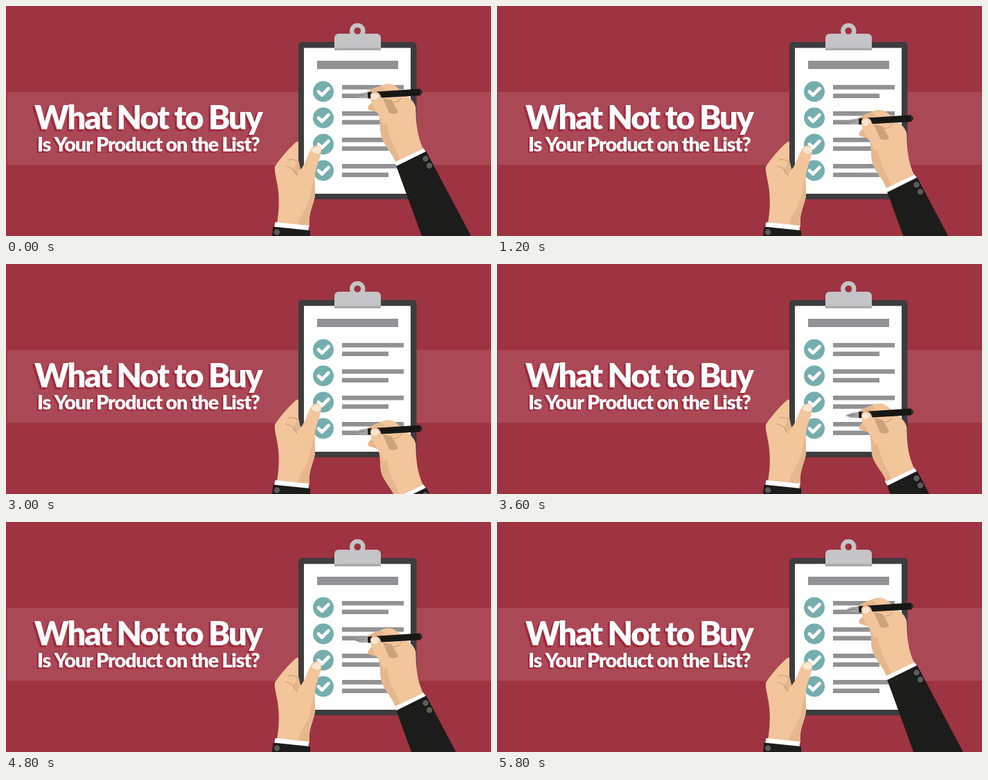
Recreate the animation shown at these times as an HTML page with a canvas. Size 700 px wide and 332 px high, loop 6 s.

```html
<!DOCTYPE html>
<html lang="en">
<head>
<meta charset="utf-8">
<title>What Not to Buy</title>
<style>
  html, body { margin: 0; width: 100%; height: 100%; overflow: hidden; background: #9e3341; }
  canvas { display: block; }
</style>
</head>
<body>
<canvas id="stage" width="700" height="332"></canvas>
<script>
const ctx = document.getElementById('stage').getContext('2d');

const LOOP = 6000;
const ROW = 38;
const STEP = 12.55;
const DOWN_TIMES = [0, 500, 700, 1200, 1400, 1600, 2100, 2300, 2500, 3000];
const UP_START = 3200, UP_HOLD = 200;
const UP_OFFSETS = [107, 97, 89, 82, 77, 68, 60, 52, 41, 32, 22, 14, 4, -3];

const SKIN = '#f2c59b', SHADE = '#e5b78d', FOLD = '#cba27a', NAIL = '#fbe6d2';
const BLACK = '#1c1c1b', GREY = '#929295';

function rect(x, y, w, h, color, radius = 0) {
  ctx.fillStyle = color;
  ctx.beginPath();
  ctx.roundRect(x, y, w, h, radius);
  ctx.fill();
}

function disc(x, y, r, color) {
  ctx.fillStyle = color;
  ctx.beginPath();
  ctx.arc(x, y, r, 0, Math.PI * 2);
  ctx.fill();
}

function shape(path, color) {
  ctx.fillStyle = color;
  ctx.fill(new Path2D(path));
}

function line(path, color, width) {
  ctx.strokeStyle = color;
  ctx.lineWidth = width;
  ctx.lineCap = 'round';
  ctx.lineJoin = 'round';
  ctx.stroke(new Path2D(path));
}

function button(x, y) {
  disc(x, y, 5.2, '#0d0d0d');
  disc(x, y, 4.4, '#5c5b5c');
}

// Picks the font size whose natural width fills the line.
function heading(text, x, baseline, width, tracking, depth) {
  const font = size => `900 ${size}px Lato, "Open Sans", sans-serif`;
  ctx.letterSpacing = '0px';
  ctx.font = font(100);
  const size = 100 * (width - tracking * (text.length - 1)) / ctx.measureText(text).width;
  ctx.font = font(size);
  ctx.letterSpacing = tracking + 'px';
  ctx.fillStyle = '#a12b3d';
  for (let d = depth; d > 0; d -= 0.5) ctx.fillText(text, x - d, baseline + d);
  ctx.fillStyle = '#fff';
  ctx.fillText(text, x, baseline);
  ctx.letterSpacing = '0px';
}

function drawBackground() {
  rect(0, 0, 700, 332, '#9e3341');
  rect(1.5, 124, 698.5, 105.5, '#ab4856');
  heading('What Not to Buy', 41, 177.5, 330, -2.2, 3);
  heading('Is Your Product on the List?', 45, 209.5, 322, -1.2, 2.5);
}

function drawClipboard() {
  rect(422, 52, 170.5, 227, '#3d3c3f', 5);
  rect(430, 60.5, 154, 210.5, '#fff');

  ctx.strokeStyle = '#c5c4c6';
  ctx.lineWidth = 6.5;
  ctx.beginPath();
  ctx.arc(507.3, 36, 8, 0, Math.PI * 2);
  ctx.stroke();
  rect(474, 40, 67, 24, '#c5c4c6', [6, 6, 0, 0]);
  rect(474, 60.5, 67, 3.5, '#a9a8aa');
  disc(507.3, 36, 4.8, '#9e3341');

  rect(449, 79, 117, 12, GREY);
  for (let row = 0; row < 4; row++) {
    const y = row * ROW;
    disc(458, 123.5 + y, 15, '#75aeae');
    ctx.save();
    ctx.translate(0, y);
    line('M451 123.5 L456 128.5 L465.5 119', '#fff', 4.8);
    ctx.restore();
    rect(485, 114 + y, 89, 6.5, GREY);
    rect(485, 126.5 + y, 67, 6.5, GREY);
  }
}

function drawHoldingHand() {
  shape(`M391 314 C394 296 395 280 392 260 C390 248 387 238 388 232
    C394 222 407 207 418 197 Q421 195 422 196 L422 224 L425 236
    C432 230 435 212 443 203 C449 199 456 203 455 209
    C454 219 448 231 446 243 C444 257 448 268 445 279
    C441 293 436 303 438 319 Z`, SKIN);
  shape(`M446 243 C444 257 448 268 445 279 C441 293 436 303 438 319
    L421 317 C424 300 438 290 440 268 Z`, SHADE);
  shape('M422 222 L425 236 C422 239 421 243 420 246 L414 237 Z', SHADE);
  line('M407 222 Q415 220 421 225 M404 231 Q413 233 417 239 M415 239 L420 244', FOLD, 1.2);
  shape('M441 209 C443 202 452 200 455 207 C454 214 447 216 441 209 Z', NAIL);
  shape('M388.5 312 L437 317 L436.5 324.5 L387 320 Z', '#fff');
  shape('M385.5 318.5 L439 324 L439 332 L384 332 Z', BLACK);
  button(391, 326.5);
}

function drawWritingHand(dy) {
  ctx.save();
  ctx.translate(0, dy);

  shape('M562.5 229 L606 209 L675.5 340 L603 340 Z', BLACK);
  button(605.5, 220.5);
  button(611, 230.5);
  shape('M559.5 224 L602 205 L606 210 L563.5 231 Z', '#fff');

  // Far fingers, then the palm
  shape('M530 138 C524 142 520 147 524 150 Q531 152 538 155 L544 148 Z', SHADE);
  shape(`M519 127 C523 121 533 118 541 115 C549 111 558 111 564 117
    L570 122 L579 130 C588 137 592 143 591.5 151 C592 174 594 188 602 206
    L562 225 C557 211 546 202 542 189 C539 178 541 168 538 157
    L527 139 L531 126 Z`, SKIN);
  shape(`M538 157 C541 168 539 178 542 189 C546 202 557 211 562 225
    L569 221 C562 203 550 190 549 160 Z`, SHADE);
  shape('M519 127 C523 121 533 118 541 115 L547 121 L534 127 Z', SHADE);
  shape('M544 133 L557 136 C560 143 564 148 566 153 Q561 158 553 154 Z', FOLD);
  line('M559 139 Q567 139 570 133', FOLD, 1.2);

  // Pen
  shape('M503 130 L511 126 L523 124.5 L523 133 L511 133 Z', '#a4a3a5');
  line('M506 130 L517 128.5', '#6f6e70', 0.8);
  shape('M522 124.5 L598 119.5 L598.5 129.3 L522.5 133.5 Z', '#171716');
  shape('M598 121.5 L601 122 L601 126.5 L598.4 127.5 Z', '#2c2b2d');

  // Thumb over the pen
  shape(`M526 131 C525 122 536 121 540 128 C543 138 550 145 552 155
    C553 165 548 173 544 171 C543 161 532 150 528 140 Z`, SKIN);
  shape('M527 132 C526.5 125 535 124 538 129 C538 135 530 138 527 132 Z', NAIL);

  ctx.restore();
}

function handOffset(time) {
  if (time < UP_START) {
    return STEP * DOWN_TIMES.findLastIndex(start => time >= start);
  }
  return UP_OFFSETS[Math.floor((time - UP_START) / UP_HOLD)];
}

const begin = performance.now();

function render() {
  const time = Math.max(0, performance.now() - begin) % LOOP;
  drawBackground();
  drawClipboard();
  drawHoldingHand();
  drawWritingHand(handOffset(time));
  requestAnimationFrame(render);
}
render();
</script>
</body>
</html>
```
